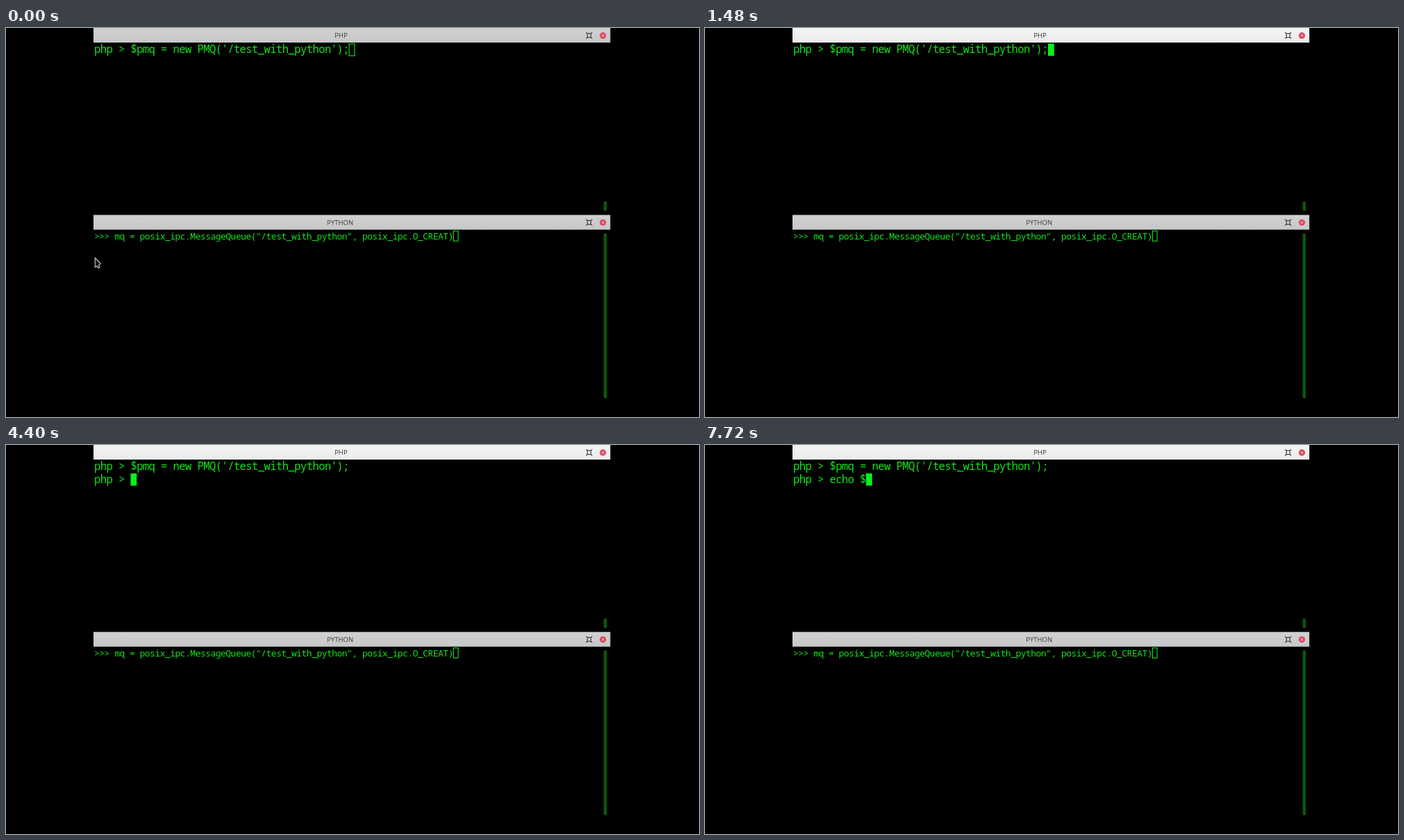
Write an HTML page that moves like this. It is 998 px wide and 561 px high and loops after 8000 ms.

```html
<!DOCTYPE html>
<html lang="en">
<head>
<meta charset="utf-8">
<title>Message queue terminals</title>
<style>
  html, body { margin: 0; width: 100%; height: 100%; overflow: hidden; background: #000; }
  svg { display: block; width: 998px; height: 561px; }
  text { white-space: pre; }
  .code { font-family: "Noto Sans Mono", "DejaVu Sans Mono", monospace; fill: #14e41a; }
  .php { font-size: 15.6px; letter-spacing: -0.622px; }
  .python { font-size: 13px; letter-spacing: -0.518px; }
  .title { font: 9.5px "Noto Sans", "Open Sans", sans-serif; fill: #414345; text-anchor: middle; }
  .scroll { fill: #0b570d; }
  .hollow { fill: none; stroke: #12d418; stroke-width: 1.2; }
</style>
</head>
<body>
<svg viewBox="0 0 998 561">
  <defs>
    <linearGradient id="idle" x2="0" y2="1">
      <stop stop-color="#d0d0d2"/><stop offset="1" stop-color="#c7c8c9"/>
    </linearGradient>
    <linearGradient id="active" x2="0" y2="1">
      <stop stop-color="#f3f4f4"/><stop offset="1" stop-color="#eaebec"/>
    </linearGradient>
    <g id="buttons">
      <rect x="837.3" y="8" width="5" height="5.6" fill="none" stroke="#303234" stroke-width="1.1"/>
      <path d="M835.3 6.4l2 1.6M844.3 6.4l-2 1.6M835.3 15.2l2-1.6M844.3 15.2l-2-1.6" stroke="#303234" stroke-width="1.1"/>
      <circle cx="859.6" cy="10.9" r="4.6" fill="#e0455c"/>
      <path d="M857.8 9.1l3.6 3.6m0-3.6l-3.6 3.6" stroke="#f6dfe2" stroke-width="1"/>
    </g>
  </defs>
  <rect width="998" height="561"/>

  <rect id="phpBar" x="126" y="0" width="744.3" height="21"/>
  <text class="title" x="482.4" y="14.4">PHP</text>
  <use href="#buttons"/>
  <text class="code php" x="127" y="36.3">php &gt; $pmq = new PMQ('/test_with_python');</text>
  <text class="code php" id="prompt" x="127" y="54.8"></text>
  <rect id="solid" width="8.8" height="17.6" fill="#08f21c"/>
  <rect class="hollow" id="phpHollow" x="494.2" y="22.8" width="7.9" height="17.2"/>
  <rect class="scroll" x="860.7" y="250" width="4.6" height="14" rx="2"/>

  <rect x="126" y="269.6" width="744.3" height="21.2" fill="url(#idle)"/>
  <text class="title" x="481.2" y="284.2">PYTHON</text>
  <use href="#buttons" y="269.6"/>
  <text class="code python" x="127" y="304.6">&gt;&gt;&gt; mq = posix_ipc.MessageQueue("/test_with_python", posix_ipc.O_CREAT)</text>
  <rect class="hollow" x="644.4" y="292.6" width="6.7" height="14.6"/>
  <rect class="scroll" x="860.7" y="296" width="4.6" height="238" rx="2"/>

  <path id="pointer" d="M128.2 331.5V345l3-1.7 1.8 3 2-1-1.5-3.2 2.8-2.2z"
        fill="#161616" stroke="#cfcfcf" stroke-width="1.1" stroke-linejoin="round"/>
</svg>
<script>
  const LOOP = 8000, STEP = 40;
  const FOCUS = 1120, ENTER = 1760;
  const LEFT = 127, CELL = 8.738;
  const typing = [
    [ENTER, ""], [3920, "$"], [4320, ""],
    [6480, "e"], [6600, "ec"], [6720, "ech"], [6840, "echo"],
    [7120, "echo "], [7520, "echo $"]
  ];
  const el = id => document.getElementById(id);
  const [bar, prompt, solid, hollow, pointer] =
    ["phpBar", "prompt", "solid", "phpHollow", "pointer"].map(el);
  const show = (node, on) => node.setAttribute("visibility", on ? "visible" : "hidden");

  function render(time) {
    const t = Math.floor(time / STEP) * STEP;
    const focused = t >= FOCUS, entered = t >= ENTER;
    const typed = typing.reduce((text, [at, next]) => t >= at ? next : text, "");
    const column = entered ? 6 + typed.length : 42;

    bar.setAttribute("fill", focused ? "url(#active)" : "url(#idle)");
    prompt.textContent = entered ? "php > " + typed : "";
    solid.setAttribute("x", LEFT + column * CELL);
    solid.setAttribute("y", entered ? 41 : 22.5);
    show(solid, focused);
    show(hollow, !focused);
    pointer.setAttribute("opacity", Math.max(0, 1 - t / 280));
  }

  const start = performance.now();
  function tick() {
    render((performance.now() - start) % LOOP);
    requestAnimationFrame(tick);
  }
  tick();
</script>
</body>
</html>
```
